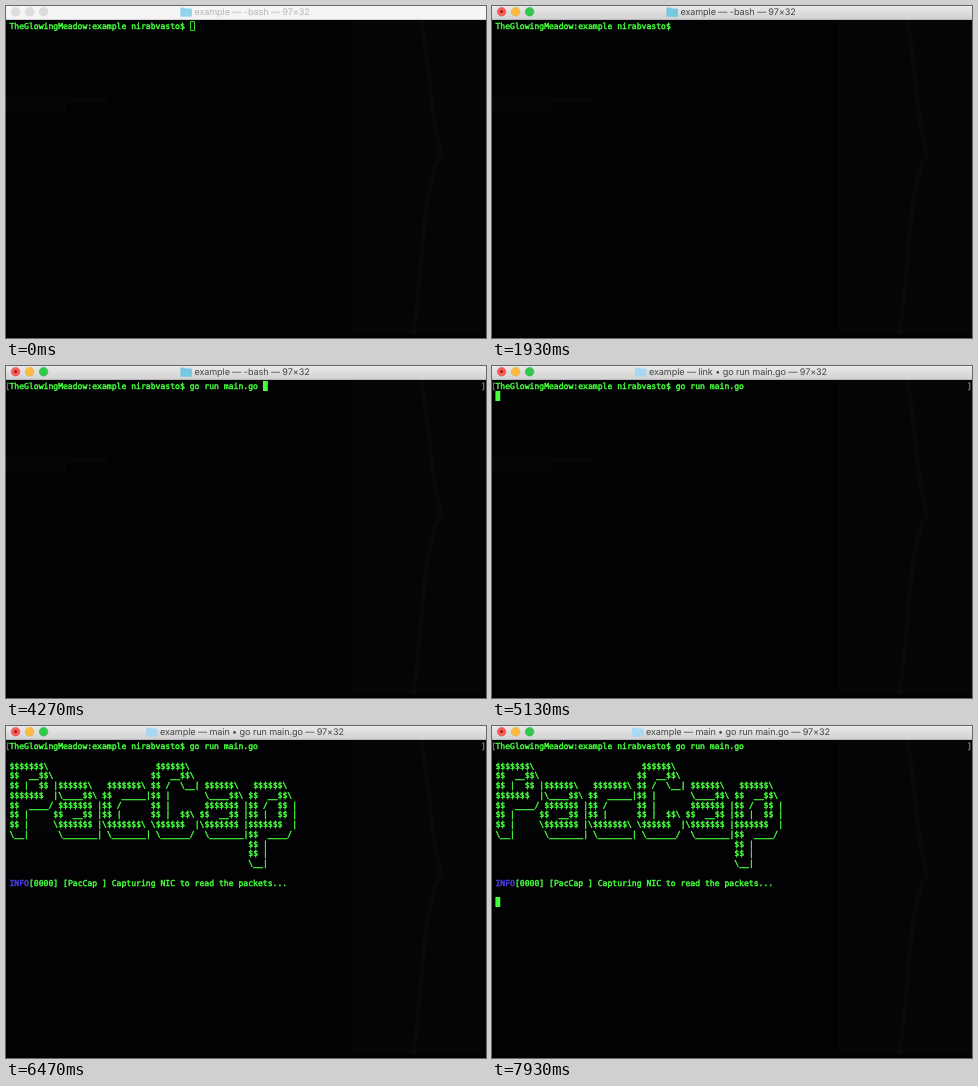
An HTML page with a canvas for the animation above (8000 ms loop, 480x332 px).

```html
<!DOCTYPE html>
<html lang="en">
<head>
<meta charset="utf-8">
<title>Terminal</title>
<style>
html, body { margin: 0; width: 100%; height: 100%; overflow: hidden; background: #000; }
canvas { display: block; width: 480px; height: 332px; }
</style>
</head>
<body>
<canvas id="stage"></canvas>
<script>
const W = 480, H = 332, LOOP = 8000;
const canvas = document.getElementById('stage');
const ctx = canvas.getContext('2d');
const dpr = window.devicePixelRatio || 1;
canvas.width = W * dpr;
canvas.height = H * dpr;

const MONO = '8.1px "DejaVu Sans Mono", monospace';
const SANS = '9.1px Inter, "DejaVu Sans", sans-serif';
const COL = 8.1 * 0.602, ROW = 9.77, LEFT = 3.4, TOP = 15;
const GREEN = '#45ff3c';

const PROMPT = 'TheGlowingMeadow:example nirabvasto$ ';
const COMMAND = 'go run main.go ';
// Key press times; completion fills in the rest of the file name.
const KEYS = [2330, 2470, 2600, 2730, 2870, 3000, 3200, 3330, 3470, 3600];
const COMPLETE = 3730, MARK = 3930, ENTER = 4400, LINK = 4800, PRINT = 5400;
const ACTIVE = 1600;

const GLYPHS = {
  P: String.raw`
$$$$$$$\
$$  __$$\
$$ |  $$ |
$$$$$$$  |
$$  ____/
$$ |
$$ |
\__|`,
  C: String.raw`
 $$$$$$\
$$  __$$\
$$ /  \__|
$$ |
$$ |
$$ |  $$\
\$$$$$$  |
 \______/`,
  a: String.raw`
 $$$$$$\
 \____$$\
 $$$$$$$ |
$$  __$$ |
\$$$$$$$ |
 \_______|`,
  c: String.raw`
 $$$$$$$\
$$  _____|
$$ /
$$ |
\$$$$$$$\
 \_______|`,
  p: String.raw`
 $$$$$$\
$$  __$$\
$$ /  $$ |
$$ |  $$ |
$$$$$$$  |
$$  ____/
$$ |
$$ |
\__|`
};

// The thin outline gives the heavier strokes of smoothed terminal text.
function put(text, col, row, color = GREEN) {
  const x = LEFT + col * COL, y = TOP + 8 + row * ROW;
  ctx.font = MONO;
  ctx.letterSpacing = '0px';
  ctx.fillStyle = ctx.strokeStyle = color;
  ctx.lineWidth = 0.45;
  ctx.fillText(text, x, y);
  ctx.strokeText(text, x, y);
}

function cursor(col, row, filled) {
  const x = LEFT + col * COL, y = Math.round(TOP + row * ROW);
  if (filled) {
    ctx.fillStyle = GREEN;
    ctx.fillRect(x, y, COL, 10);
  } else {
    ctx.strokeStyle = '#2fd828';
    ctx.lineWidth = 1;
    ctx.strokeRect(Math.round(x) + 0.5, y + 0.5, 4, 9);
  }
}

function backdrop() {
  ctx.fillStyle = '#020103';
  ctx.fillRect(0, 0, W, H);
  ctx.fillStyle = '#050406';
  ctx.fillRect(346, 14, 134, 314);
  ctx.fillStyle = '#040606';
  ctx.fillRect(0, 90, 60, 17);
  ctx.fillRect(60, 92, 42, 5);
  ctx.strokeStyle = '#0a090a';
  ctx.lineWidth = 5;
  ctx.lineJoin = 'round';
  ctx.beginPath();
  ctx.moveTo(415, 14);
  ctx.bezierCurveTo(424, 60, 424, 110, 435, 148);
  ctx.bezierCurveTo(414, 185, 419, 260, 407, 328);
  ctx.stroke();
}

function light(x, color, edge) {
  ctx.fillStyle = color;
  ctx.strokeStyle = edge;
  ctx.lineWidth = 0.5;
  ctx.beginPath();
  ctx.arc(x, 5.7, 4.3, 0, 7);
  ctx.fill();
  ctx.stroke();
}

function folder(x, color) {
  ctx.fillStyle = color;
  ctx.beginPath();
  ctx.roundRect(x, 1.5, 5, 4, 1);
  ctx.roundRect(x, 2.6, 11.5, 8.2, 0.8);
  ctx.fill();
}

function titleBar(t) {
  const on = t >= ACTIVE;
  const bar = ctx.createLinearGradient(0, 0, 0, 13);
  bar.addColorStop(0, on ? '#e9e9e9' : '#f6f6f6');
  bar.addColorStop(1, on ? '#d2d2d2' : '#f4f4f4');
  ctx.fillStyle = bar;
  ctx.fillRect(0, 0, W, 13);
  ctx.fillStyle = on ? '#b8b8b8' : '#d4d4d4';
  ctx.fillRect(0, 13, W, 1);

  if (on) {
    light(9.6, '#fc5b57', '#df4744');
    light(23.6, '#fdbc40', '#dea034');
    light(37.6, '#34c84a', '#27aa35');
    ctx.fillStyle = '#8a1512';
    ctx.beginPath();
    ctx.arc(9.6, 5.7, 1.4, 0, 7);
    ctx.fill();
  } else {
    for (const x of [9.6, 23.6, 37.6]) light(x, '#dcdcdc', '#cfcfcf');
  }

  const job = t < ENTER ? '-bash'
    : (t < LINK ? 'go' : t < PRINT ? 'link' : 'main') + ' • go run main.go';
  const title = `example — ${job} — 97×32`;
  ctx.font = SANS;
  ctx.letterSpacing = '-0.1px';
  const x = 239 - (ctx.measureText(title).width + 14) / 2;
  folder(x, t < ENTER ? (on ? '#78c7e2' : '#90d3ea') : '#a9d9f2');
  ctx.fillStyle = on ? '#454545' : '#b6b6b6';
  ctx.fillText(title, x + 14, 9.2);
}

function banner() {
  [...'PacCap'].forEach((ch, i) => {
    const col = i ? i * 10 - 1 : 0;
    const row = ch < 'a' ? 2 : 4;
    GLYPHS[ch].slice(1).split('\n').forEach((line, j) => put(line, col, row + j));
  });
  put('INFO', 0, 14, '#4b3fe0');
  put('[0000] [PacCap ] Capturing NIC to read the packets...', 4, 14);
}

function typed(t) {
  return t >= COMPLETE ? COMMAND.length : KEYS.filter(k => t >= k).length;
}

function blinkOff(t) {
  return [[1870, 2130], [6130, 6730], [7270, 7630]].some(([a, b]) => t >= a && t < b);
}

function draw(t) {
  ctx.setTransform(dpr, 0, 0, dpr, 0, 0);
  ctx.textRendering = 'geometricPrecision';
  backdrop();
  titleBar(t);
  const n = typed(t);
  put(PROMPT + COMMAND.slice(0, n), 0, 0);
  if (t >= MARK) {
    put('[', -0.85, 0, '#6f7a6f');
    put(']', 96.7, 0, '#6f7a6f');
  }
  if (t >= PRINT) banner();
  if (blinkOff(t)) return;
  if (t < ENTER) cursor(PROMPT.length + n, 0, t >= ACTIVE);
  else cursor(0, t < PRINT ? 1 : 16, true);
}

function tick() {
  draw(performance.now() % LOOP);
  requestAnimationFrame(tick);
}
tick();
</script>
</body>
</html>
```
